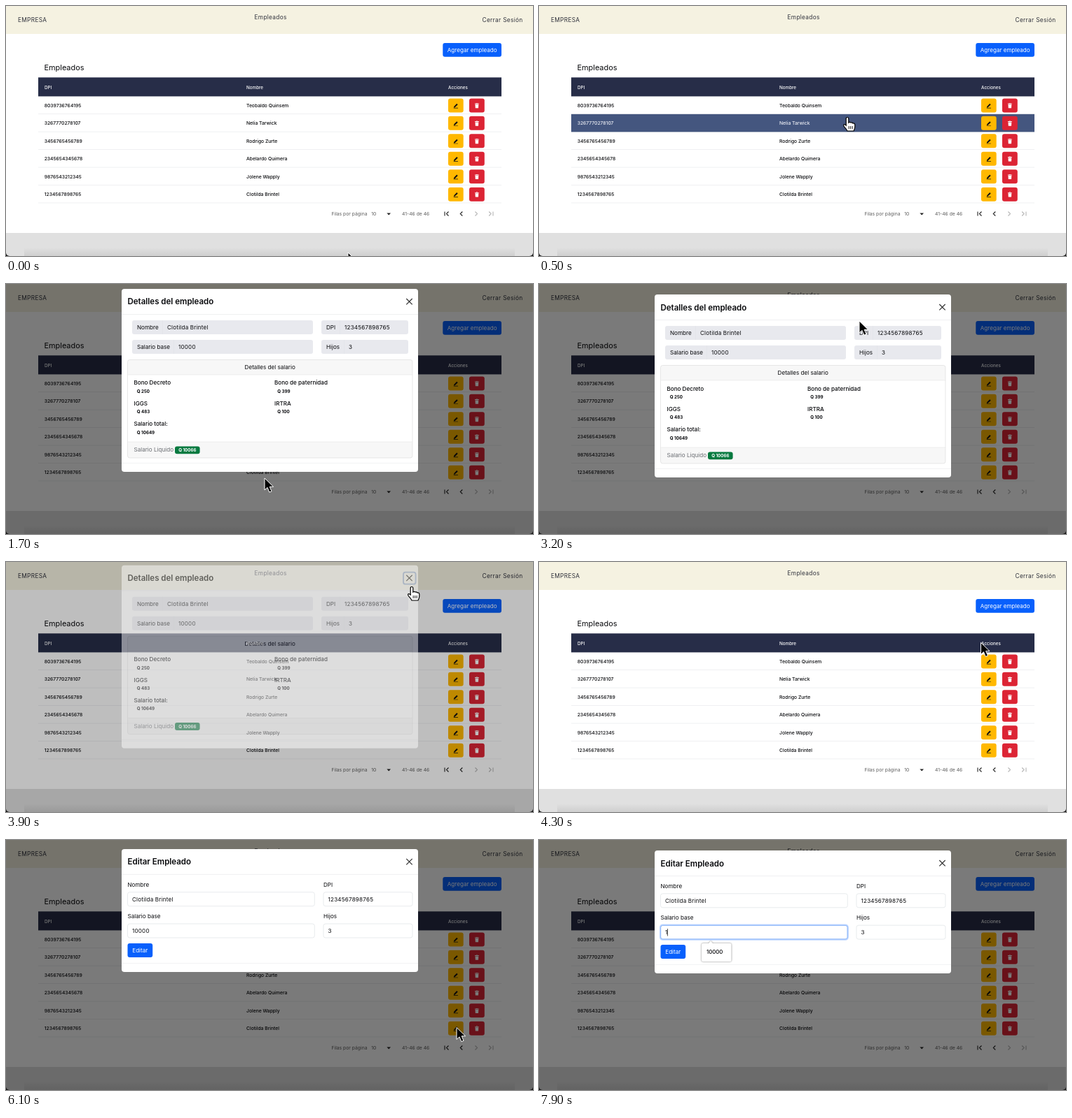
Recreate the animation shown at these times as an HTML page. Size 752 px wide and 358 px high, loop 8000 ms.

```html
<!DOCTYPE html>
<html lang="es">
<head>
<meta charset="utf-8">
<title>Empleados</title>
<style>
  html, body { margin: 0; width: 100%; height: 100%; overflow: hidden; background: #fff; }
  svg { display: block; width: 752px; height: 358px; font: 8.1px Inter, "Open Sans", sans-serif; }
  text { fill: #08090c; white-space: pre; }
</style>
</head>
<body>
<svg id="stage" viewBox="0 0 752 358"></svg>
<script>
const LOOP = 8000, STEP = 100;
const OPEN_INFO = 1550, CLOSE_INFO = 3823, OPEN_EDIT = 5868;
const FOCUS = 7400, SELECT = 7600, TYPE = 7900;
const ROW_TOP = 129.4, ROW_H = 25.47;

const PEOPLE = [
  ['8039736764195', 'Teobaldo Quinsem'],
  ['3267770278107', 'Nelia Tarwick'],
  ['3456765456789', 'Rodrigo Zurte'],
  ['2345654345678', 'Abelardo Quimera'],
  ['9876543212345', 'Jolene Wapply'],
  ['1234567898765', 'Clotilda Brintel'],
];
const [DPI, NAME] = PEOPLE[5];

// pointer: time, x, y
const TRACK = [
  [0, 488, 353], [500, 440, 160], [1000, 382, 265], [1300, 369, 278],
  [1700, 369, 278], [2100, 300, 168], [2400, 235, 200], [2700, 402, 221],
  [2900, 421, 230], [3000, 421, 230], [3200, 457, 53], [3400, 520, 58],
  [3700, 579, 36], [4000, 579, 36], [4400, 640, 130], [4800, 600, 255],
  [5000, 570, 248], [5300, 653, 277.5], [5700, 643, 268.5], [6200, 643, 268.5],
  [6600, 480, 185], [7100, 215, 140], [7300, 200, 133], [8000, 200, 133],
];

const svg = document.getElementById('stage');
function add(parent, tag, attrs = {}, content) {
  const el = document.createElementNS('http://www.w3.org/2000/svg', tag);
  for (const k in attrs) el.setAttribute(k, attrs[k]);
  if (content !== undefined) el.textContent = content;
  return parent.appendChild(el);
}
const group = (p, attrs) => add(p, 'g', attrs);
const box = (p, x, y, x2, y2, fill, r = 0, more = {}) =>
  add(p, 'rect', { x, y, width: x2 - x, height: y2 - y, rx: r, fill, ...more });
const label = (p, x, y, s, more = {}) => add(p, 'text', { x, y, ...more }, s);
const path = (p, d, more = {}) => add(p, 'path', { d, ...more });
const stroke = (color, width = 1) => ({ fill: 'none', stroke: color, 'stroke-width': width });
const show = (el, on) => { el.style.display = on ? '' : 'none'; };

// page
const page = group(svg);
box(page, 0, 0, 752, 358, '#fff');
box(page, 0, 0, 752, 40, '#f5f2e1');
const nav = { 'font-size': 8.3, 'letter-spacing': .32, style: 'fill:#30323c' };
label(page, 17, 23.2, 'EMPRESA', nav);
label(page, 354.5, 19, 'Empleados', nav);
label(page, 679.5, 23.2, 'Cerrar Sesión', nav);
box(page, 623.3, 53, 707, 72.7, '#0860fc', 3);
label(page, 665.2, 65.9, 'Agregar empleado', { 'text-anchor': 'middle', style: 'fill:#fff' });
label(page, 54.5, 91.5, 'Empleados', { 'font-size': 10.9 });
box(page, 46, 102.3, 707, ROW_TOP, '#272d48');
[[55, 'DPI'], [343, 'Nombre'], [631, 'Acciones']].forEach(([x, s]) =>
  label(page, x, 118.5, s, { 'font-size': 6.3, 'font-weight': 500, style: 'fill:#fff' }));

const rows = PEOPLE.map((cells, i) => {
  const y = ROW_TOP + i * ROW_H, mid = y + 13.1;
  box(page, 46, y + ROW_H - .5, 707, y + ROW_H, '#dfe1e4');
  const hover = box(page, 46, y, 707, y + ROW_H, '#44567f');
  const texts = cells.map((s, c) =>
    label(page, c ? 343 : 54.7, mid + 2.5, s, { 'font-size': 6.75, 'font-weight': 500 }));
  box(page, 631, mid - 10.1, 652.7, mid + 9.9, '#ffb800', 3);
  box(page, 661, mid - 10.1, 682.8, mid + 9.9, '#dc2434', 3);
  path(page, 'M-2.6 1.4 1.4-2.8 2.9-1.3-1.1 2.5-2.9 3zM-3 3.2H3.2V3.9H-3z',
    { transform: `translate(641.8 ${mid})`, fill: '#111' });
  path(page, 'M-2.9-2.9h1.8l.5-.6H.6l.5.6H2.9V-2H-2.9zM-2.4-1.5H2.4L2.1 3.7H-2.1z',
    { transform: `translate(671.9 ${mid})`, fill: '#fff' });
  return { hover, texts };
});

const small = { 'font-size': 6.8, style: 'fill:#5f5f5f' };
label(page, 464.5, 300, 'Filas por página', small);
label(page, 521.3, 300, '10', small);
label(page, 565, 300, '41-46 de 46', small);
path(page, 'M543.4 296.5h5.6l-2.8 2.9z', { fill: '#222' });
path(page, 'M626 294.5v6M631.5 294.5l-3 3 3 3M651.3 294.5l-3 3 3 3', stroke('#222', 1.1));
path(page, 'M669.5 294.5l3 3-3 3M689.2 294.5l3 3-3 3M695 294.5v6', stroke('#b5b5b5', 1.1));
box(page, 0, 325, 752, 358, '#e0e0e0');
const fade = add(add(svg, 'defs'), 'linearGradient', { id: 'dock', x2: 0, y2: 1 });
add(fade, 'stop', { offset: 0, 'stop-color': '#e0e0e0' });
add(fade, 'stop', { offset: 1, 'stop-color': '#cfcfcf' });
box(page, 26, 346, 726, 358, 'url(#dock)');

const shade = box(svg, 0, 0, 752, 358, '#000');

function dialog(title, bottom) {
  const g = group(svg);
  box(g, 165, 15, 588, bottom, '#fff', 4);
  label(g, 173.5, 37.5, title, { 'font-size': 11.5, 'font-weight': 600 });
  path(g, 'M571.3 29l8.4 8.4M579.7 29l-8.4 8.4', stroke('#333', 1.2));
  box(g, 165, 51, 588, 51.6, '#e4e6e8');
  box(g, 165, bottom - 12.6, 588, bottom - 12, '#e9ebed');
  return g;
}
const typed = { 'letter-spacing': .2 };

// details dialog
const info = dialog('Detalles del empleado', 277);
const closeRing = box(info, 567, 25, 584.6, 42, 'none', 3, stroke('#9fb6e0', 1.8));
[[180, 60, 438, 'Nombre', 230, NAME], [450, 60, 574, 'DPI', 483, DPI],
 [180, 88, 438, 'Salario base', 246, '10000'], [450, 88, 574, 'Hijos', 489, '3']]
  .forEach(([x, y, x2, name, vx, value]) => {
    box(info, x, y, x2, y + 20, '#e8e9ee', 3);
    box(info, vx - 7, y, vx - 6.5, y + 20, '#dfe1e6');
    label(info, x + 7, y + 13, name);
    label(info, vx, y + 13, value, typed);
  });
box(info, 173.5, 116.5, 580, 138, '#f7f7f7', 3);
box(info, 173.5, 234, 580, 257, '#f7f7f7', 3);
box(info, 173.5, 137.7, 580, 138.2, '#dcdcdc');
box(info, 173.5, 233.8, 580, 234.3, '#dcdcdc');
box(info, 173.5, 116.5, 580, 257, 'none', 3, stroke('#d9d9d9', .6));
label(info, 376.7, 130.4, 'Detalles del salario', { 'text-anchor': 'middle' });
const badge = { 'font-size': 6.2, 'font-weight': 700 };
[[182.5, 152.5, 'Bono Decreto', '250'], [383, 152.5, 'Bono de paternidad', '399'],
 [182.5, 182, 'IGGS', '483'], [383, 182, 'IRTRA', '100'],
 [182.5, 211.3, 'Salario total:', '10649']].forEach(([x, y, name, sum]) => {
  label(info, x, y, name, { 'font-weight': 500 });
  label(info, x + 4.3, y + 11.4, 'Q ' + sum, badge);
});
label(info, 182.5, 248.4, 'Salario Liquido', { style: 'fill:#6a6d72' });
box(info, 241, 240.4, 276.6, 251.2, '#087a40', 3);
label(info, 258.8, 248.2, 'Q 10066', { ...badge, 'text-anchor': 'middle', style: 'fill:#fff' });

// edit dialog
const edit = dialog('Editar Empleado', 191);
[[173.5, 69, 440.3, 'Nombre', NAME], [453, 69, 580, 'DPI', DPI],
 [453, 114.3, 580, 'Hijos', '3'], [173.5, 114.3, 440.3, 'Salario base', '']]
  .forEach(([x, y, x2, name, value]) => {
    label(edit, x, y, name);
    box(edit, x, y + 7.8, x2, y + 27.8, '#fff', 3, { stroke: '#dee2e6', 'stroke-width': .7 });
    label(edit, x + 6.5, y + 20.8, value, typed);
  });
const ring = group(edit);
box(ring, 172.9, 121.5, 440.9, 142.7, 'none', 3.5, stroke('#c0d7ff', 2));
box(ring, 173.7, 122.3, 440.1, 141.9, 'none', 3, stroke('#80b0fa', .9));
const selection = box(edit, 179.5, 126.5, 205, 138, '#b4d5fe');
const salary = label(edit, 180, 135.1, '', typed);
const caret = box(edit, 183.3, 127, 184, 137.5, '#111');
box(edit, 173.5, 150, 209.2, 170, '#0860fc', 3);
label(edit, 191.3, 163, 'Editar', { 'text-anchor': 'middle', style: 'fill:#fff' });
const hint = group(edit, { style: 'filter:drop-shadow(0 .5px 1px #0008)' });
path(hint, 'M232 150q0-2 2-2h8l3-3.5 3 3.5h24.5q2 0 2 2v22q0 2-2 2h-38.5q-2 0-2-2z', { fill: '#fff' });
label(hint, 239, 163.4, '10000', { 'font-size': 7.8, 'font-weight': 500 });

// rounded screen corners
path(svg, 'M0 353.5V358H5Q.5 357.6 0 353.5zM752 353.5V358H747Q751.5 357.6 752 353.5z', { fill: '#111' });

// pointers
const pointer = group(svg);
const arrow = path(pointer, 'M0 0V17L4 13.4 6.8 20.2 10 18.8 7.2 12.3H12.6z',
  { fill: '#000', stroke: '#fff', 'stroke-width': 1 });
const hand = group(pointer);
path(hand, 'M-1.8 1.5Q-1.8-.5 0-.5T1.8 1.5V7Q3.2 5.6 5 7 6.6 6.3 8 8 10.5 7.6 10.8 10V13Q10.6 16 9 19H0Q-1 16.5-4.5 12.8-6.2 10.5-4.6 9.6-3.4 9.2-1.8 11z',
  { fill: '#fff', stroke: '#000', 'stroke-width': 1.2 });
path(hand, 'M2.2 12v4M4.7 12v4M7.2 12v4', stroke('#000', .9));
const beam = path(pointer, 'M-2.5-7Q0-7 0-5.5 0-7 2.5-7M0-6V6M-2.5 7Q0 7 0 5.5 0 7 2.5 7', stroke('#222', .9));

const clamp = v => Math.min(1, Math.max(0, v));
const easeOut = k => 1 - (1 - clamp(k)) ** 1.7;

function place(t) {
  const i = Math.max(1, TRACK.findIndex(k => k[0] > t));
  const [t0, x0, y0] = TRACK[i - 1], [t1, x1, y1] = TRACK[i];
  const k = clamp((t - t0) / (t1 - t0)), e = k * k * (3 - 2 * k);
  return [x0 + (x1 - x0) * e, y0 + (y1 - y0) * e];
}

// fade lasts 150 ms, slide 300 ms
function pose(el, t, from, to) {
  const alpha = clamp((t - from) / 150) * (1 - clamp((t - to) / 150));
  const slide = t < to ? 1 - easeOut((t - from) / 300) : easeOut((t - to) / 300);
  show(el, alpha > 0);
  el.setAttribute('opacity', alpha);
  el.setAttribute('transform', `translate(0 ${-26 * slide})`);
  return alpha;
}

const within = (x, y, a, b, c, d) => x >= a && x <= c && y >= b && y <= d;

function draw(t) {
  const a = pose(info, t, OPEN_INFO, CLOSE_INFO);
  const b = pose(edit, t, OPEN_EDIT, Infinity);
  const blocked = a + b > 0;
  shade.setAttribute('opacity', (a + b) * .52);
  show(closeRing, t >= CLOSE_INFO);

  const [x, y] = place(t);
  const over = !blocked && within(x, y, 46, ROW_TOP, 707, 282.2) ? Math.floor((y - ROW_TOP) / ROW_H) : -1;
  rows.forEach((row, i) => {
    show(row.hover, i === over);
    row.texts.forEach(s => { s.style.fill = i === over ? '#eef0f6' : ''; });
  });

  show(ring, t >= FOCUS);
  show(selection, t >= SELECT && t < TYPE);
  show(caret, t >= TYPE);
  show(hint, t >= TYPE);
  salary.textContent = t < TYPE ? '10000' : '1';

  const onHand = over >= 0 || (a > 0 && within(x, y, 566, 24, 586, 43));
  const onText = b > 0 && within(x, y, 173.5, 122, 440, 142);
  show(hand, onHand);
  show(beam, onText);
  show(arrow, !onHand && !onText);
  show(pointer, t < TYPE);
  pointer.setAttribute('transform', `translate(${x} ${y})`);
}

const start = performance.now();
function tick() {
  const t = (performance.now() - start) % LOOP;
  draw(Math.floor(t / STEP) * STEP);
  requestAnimationFrame(tick);
}
tick();
</script>
</body>
</html>
```
